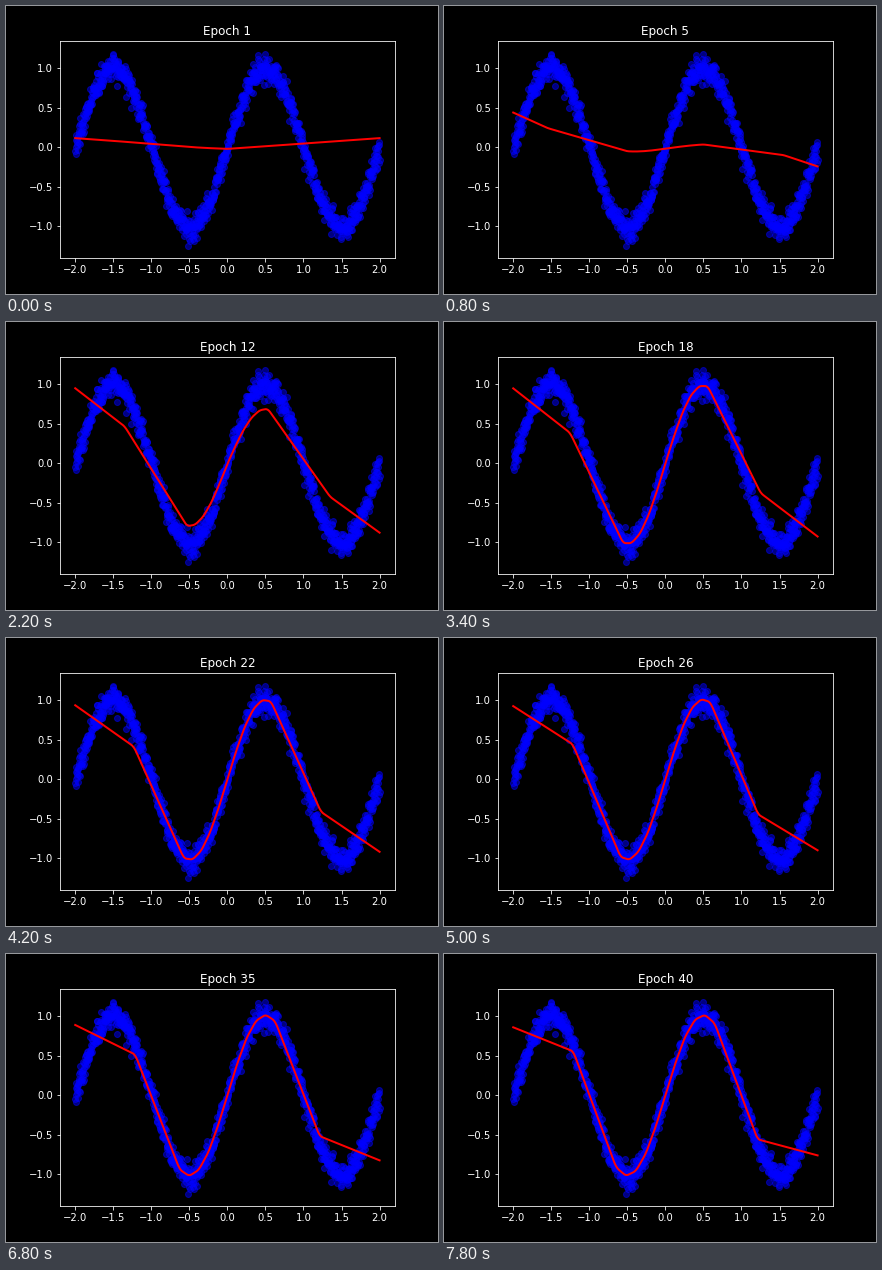
A matplotlib script that plays this animation: 432 by 288 pixels, repeating every 8 s.

```python
import numpy as np
import matplotlib.pyplot as plt
from matplotlib.animation import FuncAnimation

plt.style.use("dark_background")
plt.rcParams["font.family"] = "DejaVu Sans"

EPOCHS = 40
STEP_MS = 200


def branch(dist, epoch, side):
    """One half of the fit: a sine arch, a straight flank, a straight tail."""
    arch = 1.02 / (1 + np.exp((10.3 - epoch) / 1.7))
    arch *= 1 - side * .21 * np.exp((8 - epoch) / 4)
    tail = 1 - np.exp(-((epoch - 1) / 6) ** 2)
    fade = (epoch / EPOCHS) ** 3

    shoulder = .48 + .0042 * epoch
    bend = min(1.55, 1.21 + .31 * np.exp((8 - epoch) / 5))
    dip = tail * (.38 + .008 * (epoch - 18)
                  + .35 * np.exp(-((epoch - 8) / 4) ** 2))
    tip = tail * (.95 - (.14 + .05 * side) * fade)

    rise = np.linspace(0, shoulder, 6)
    knots = np.append(rise, [bend, 2])
    heights = np.append(arch * np.sin(np.pi * rise), [-dip, -tip])
    return side * np.interp(dist, knots, heights)


def fit(x, epoch):
    odd = np.where(x < 0, branch(-x, epoch, -1), branch(x, epoch, 1))
    # The untrained V shape fades away.
    vee = (.068 * np.abs(x) - .02) * np.exp(-((epoch - 1) / 10) ** 2)
    return odd + vee


def curve(x, epoch):
    # A small moving average rounds the bends.
    reach = np.minimum(.03, 2 - np.abs(x))
    return np.mean([fit(x + k * reach, epoch)
                    for k in np.linspace(-1, 1, 7)], axis=0)


rng = np.random.default_rng(4)
px = np.linspace(-2, 2, 1000)
py = np.sin(np.pi * px) + rng.normal(0, .08, px.size)

fig, ax = plt.subplots(figsize=(6, 4), dpi=72)
fig.subplots_adjust(left=.125, right=.9, bottom=.125, top=.88)
ax.scatter(px, py, color="blue", alpha=.5)
ax.set_xlim(-2.2, 2.2)
ax.set_ylim(-1.4, 1.35)

xs = np.linspace(-2, 2, 401)
line, = ax.plot(xs, curve(xs, 1), color="red", lw=2)
title = ax.set_title("Epoch 1")


def update(frame):
    epoch = frame + 1
    line.set_ydata(curve(xs, epoch))
    title.set_text(f"Epoch {epoch}")
    return line, title


anim = FuncAnimation(fig, update, frames=EPOCHS, interval=STEP_MS,
                     repeat=True, repeat_delay=0, blit=False)
plt.show()
```
